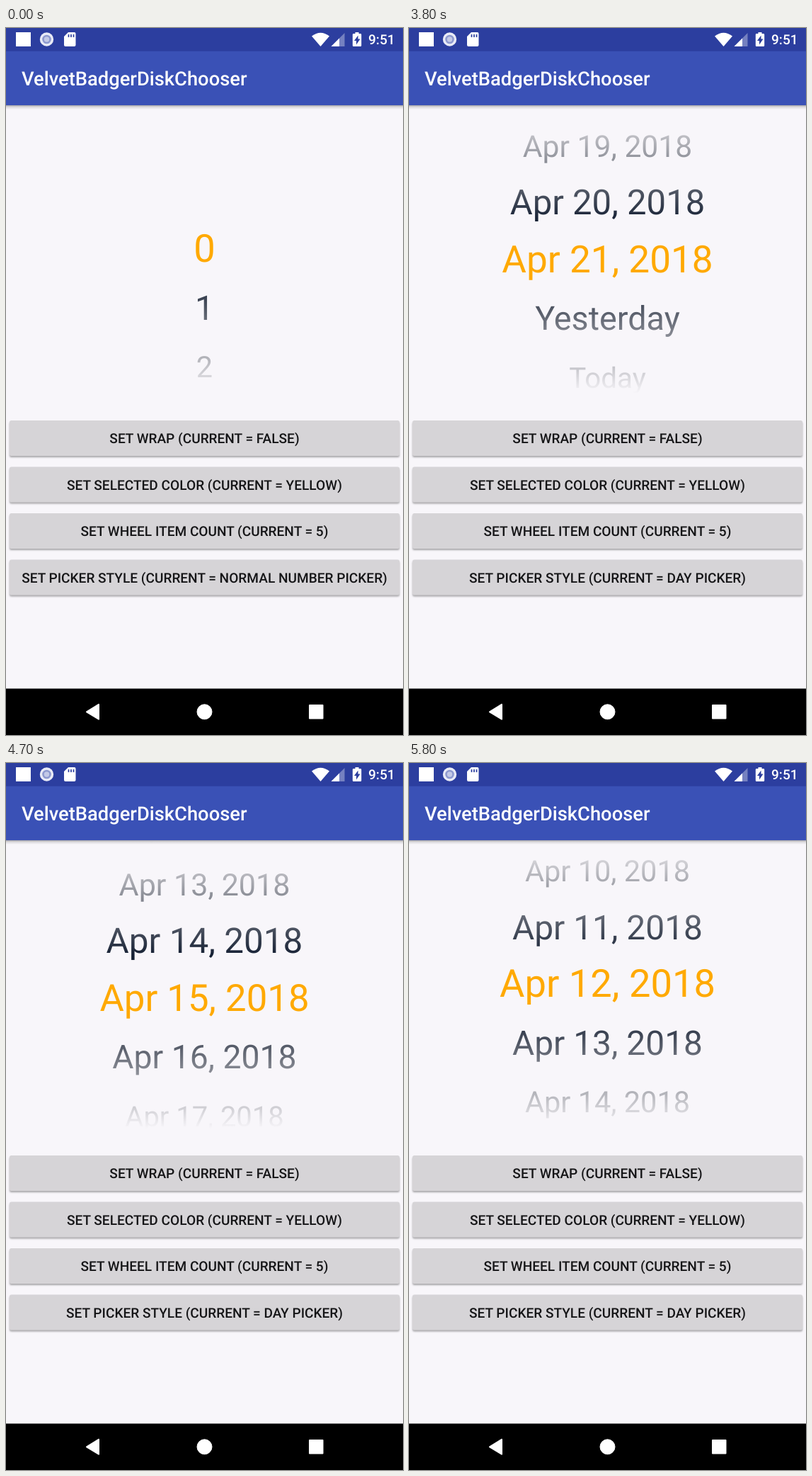
Write an HTML page that moves like this. It is 561 by 998 pixels and loops after 6.1 s.

```html
<!DOCTYPE html>
<html lang="en">
<head>
<meta charset="utf-8">
<title>Wheel picker</title>
<style>
  html, body { margin: 0; width: 100%; height: 100%; overflow: hidden; background: #f8f6fa; }
  svg { display: block; width: 561px; height: 998px; font-family: Roboto, "Noto Sans", sans-serif; }
  text { text-rendering: geometricPrecision; }
  .medium { font-weight: 500; font-size: 19.1px; }
  .middle { text-anchor: middle; }
  .button { fill: #d6d4d7; filter: drop-shadow(0 2px 1.2px rgba(0, 0, 0, .32)); }
</style>
</head>
<body>
<svg viewBox="0 0 561 998">
  <defs>
    <linearGradient id="fade" gradientUnits="userSpaceOnUse" x1="0" y1="110" x2="0" y2="516">
      <stop offset="0" stop-color="#1a1e26" stop-opacity="0"/>
      <stop offset=".4" stop-color="#141f33"/>
      <stop offset=".6" stop-color="#141f33"/>
      <stop offset="1" stop-color="#1a1e26" stop-opacity="0"/>
    </linearGradient>
    <linearGradient id="shadow" x2="0" y2="1">
      <stop offset="0" stop-opacity=".34"/>
      <stop offset=".4" stop-opacity=".12"/>
      <stop offset="1" stop-opacity="0"/>
    </linearGradient>
    <clipPath id="window"><rect y="110" width="561" height="406"/></clipPath>
  </defs>

  <rect width="561" height="998" fill="#f8f6fa"/>
  <g id="wheel" class="middle" clip-path="url(#window)"></g>
  <g id="buttons" class="medium middle" fill="#151517"></g>

  <!-- status bar and title bar -->
  <rect y="109" width="561" height="6" fill="url(#shadow)"/>
  <rect width="561" height="109" fill="#3a51b6"/>
  <rect width="561" height="32.7" fill="#2c3e9f"/>
  <g fill="#fff">
    <rect x="14" y="6" width="21" height="20"/>
    <circle cx="57.5" cy="16" r="9.7" fill="#e9ebf6"/>
    <circle cx="57.5" cy="16" r="5" fill="#c3c9e6" stroke="#8d99cf" stroke-width="2.6"/>
    <path d="M88 6h8.500q2 0 2 2v16q0 2-2 2h-12.500q-2 0-2-2V12z"/>
    <path d="M88.500 9v4M92 9v4M95.500 9v4" stroke="#2c3e9f" stroke-width="1.7"/>
    <path d="M432 11.500Q444.500 2 457 11.500L444.500 26z"/>
    <path d="M478.500 7v19h-19z" opacity=".35"/>
    <path d="M471 14.500V26h-11.500z"/>
    <path d="M493.500 8V6h5v2h2.500q1.200 0 1.200 1.200v15.600q0 1.200-1.200 1.200h-10q-1.200 0-1.200-1.200V9.200q0-1.200 1.200-1.200z"/>
    <path d="M497.500 10.500v5h3l-5.500 8v-5.500h-3z" fill="#2c3e9f"/>
    <text class="medium" x="512" y="23.200">9:51</text>
    <text x="22" y="81.200" font-size="27.300" font-weight="500">VelvetBadgerDiskChooser</text>
  </g>

  <!-- navigation bar -->
  <rect y="932.500" width="561" height="66" fill="#000"/>
  <g fill="#fff" stroke="#fff" stroke-linejoin="round">
    <path d="M114 965.300l17-10.400v20.800z" stroke-width="2"/>
    <circle cx="280.500" cy="965.300" r="10.500"/>
    <rect x="429" y="956" width="18.500" height="18.500" stroke-width="2"/>
  </g>
</svg>
<script>
const LOOP = 6100, STEP = 100, DAY_MODE = 2200;
const CENTER_X = 280.5, BASELINE = 330, PITCH = 81.5;

// Wheel position over time: [ms, item at the centre]
const path = [[3500, 0], [3600, -.4], [3800, -2.18], [4300, -6.6],
  [4700, -8.245], [5000, -10.5], [5200, -11.125], [5800, -11]];

function add(parent, tag, attrs, text = '') {
  const el = document.createElementNS('http://www.w3.org/2000/svg', tag);
  for (const key in attrs) el.setAttribute(key, attrs[key]);
  el.textContent = text;
  return parent.appendChild(el);
}

const labels = ['SET WRAP (CURRENT = FALSE)', 'SET SELECTED COLOR (CURRENT = YELLOW)',
  'SET WHEEL ITEM COUNT (CURRENT = 5)', ''].map((text, i) => {
  const y = 554 + i * 65.5;
  add(buttons, 'rect', { class: 'button', x: 5, y, width: 551, height: 50, rx: 2.5 });
  return add(buttons, 'text', { x: CENTER_X, y: y + 32.3 }, text);
});
const styleLabel = labels[3];
const rows = Array.from({ length: 7 }, () => add(wheel, 'text', { x: CENTER_X }));

const rate = (a, b) => (b[1] - a[1]) / (b[0] - a[0]);

// Slope at a point; flat at the ends and where the direction turns
function slope(i) {
  if (i === 0 || i === path.length - 1) return 0;
  const before = rate(path[i - 1], path[i]), after = rate(path[i], path[i + 1]);
  return before * after <= 0 ? 0 : 2 * before * after / (before + after);
}

function position(t) {
  if (t <= path[0][0]) return 0;
  const i = path.findIndex(p => p[0] >= t);
  if (i < 0) return path[path.length - 1][1];
  const [t0, a] = path[i - 1], [t1, b] = path[i];
  const span = t1 - t0, u = (t - t0) / span, v = 1 - u;
  return v * v * ((1 + 2 * u) * a + u * span * slope(i - 1))
       + u * u * ((1 + 2 * v) * b - v * span * slope(i));
}

function dayName(k) {
  return { '-1': 'Yesterday', 0: 'Today', 1: 'Tomorrow' }[k] || `Apr ${23 + k}, 2018`;
}

function draw(now) {
  const t = Math.floor(now % LOOP / STEP) * STEP;
  const days = t >= DAY_MODE, center = position(t), selected = Math.round(center);
  styleLabel.textContent = `SET PICKER STYLE (CURRENT = ${days ? 'DAY PICKER' : 'NORMAL NUMBER PICKER'})`;
  rows.forEach((row, i) => {
    const k = selected + i - 3, d = k - center;
    row.textContent = days ? dayName(k) : k < 0 ? '' : k;
    row.setAttribute('y', BASELINE + d * PITCH);
    row.setAttribute('font-size', 54.3 - 6.4 * Math.abs(d));
    row.setAttribute('fill', k === selected ? '#ffa900' : 'url(#fade)');
  });
}

const start = performance.now();
function tick() {
  draw(performance.now() - start);
  requestAnimationFrame(tick);
}
tick();
</script>
</body>
</html>
```
